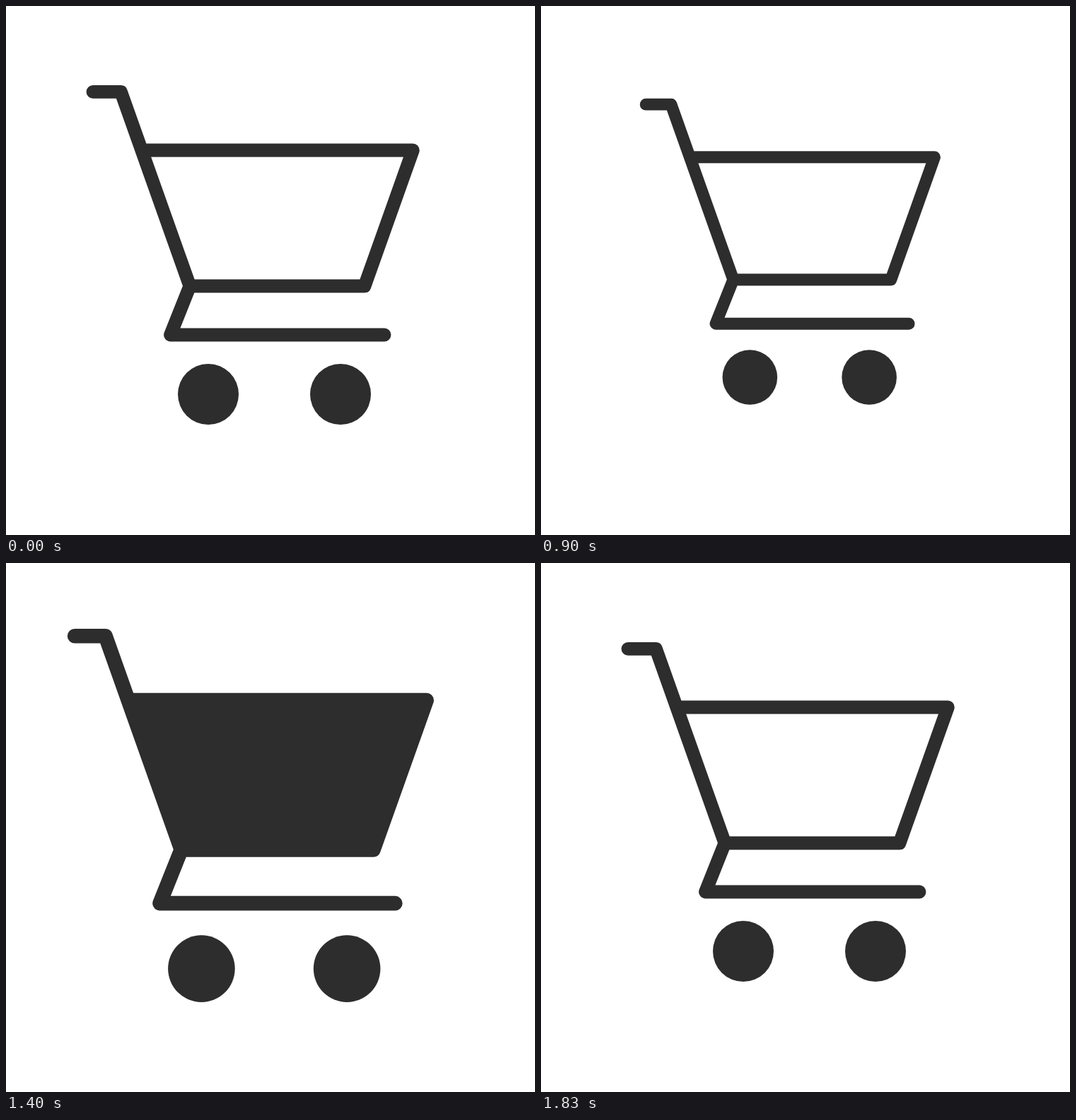
Animation of 748 by 748 pixels, one loop 3060 ms. Source, as an HTML page:

```html
<!DOCTYPE html>
<html lang="en">
<head>
<meta charset="utf-8">
<title>Shopping cart</title>
<style>
  html, body { margin: 0; width: 100%; height: 100%; overflow: hidden; background: #fff; }
  svg { display: block; width: 100vw; height: 100vh; }
  .ink { fill: none; stroke: #2d2d2d; stroke-width: 18.8; stroke-linecap: round; stroke-linejoin: round; }
  .solid { fill: #2d2d2d; }
  #rays { stroke-linecap: round; }
  .rim { stroke: #2d2d2d; stroke-width: 25; }
  .core { stroke: #fff; stroke-width: 13; }
</style>
</head>
<body>
<svg viewBox="0 0 748 748">
  <g id="icon">
    <g id="rays" transform="translate(376 373.6)"></g>
    <path id="load" class="solid" d="M192 204H575.3L507 396H260Z"/>
    <path class="ink" d="M123 121.4H162.5L260 396L232.5 465H535M192 204H575.3L507 396H260"/>
    <circle class="solid" cx="286" cy="549" r="43"/>
    <circle class="solid" cx="473" cy="549" r="43"/>
  </g>
</svg>
<script>
const LOOP = 3060, STEP = 100 / 3;
const RAY_START = 150, RAY_END = 313;
const icon = document.getElementById('icon');
const rays = document.getElementById('rays');
const load = document.getElementById('load');

// Eight outlined rays: a dark line with a white line on top
for (let i = 0; i < 8; i++) {
  for (const kind of ['rim', 'core']) {
    const line = document.createElementNS('http://www.w3.org/2000/svg', 'line');
    line.setAttribute('class', kind);
    line.setAttribute('transform', `rotate(${22.5 + i * 45})`);
    rays.append(line);
  }
}

const clamp = v => Math.min(1, Math.max(0, v));
const mix = (a, b, p) => a + (b - a) * p;
const ramp = (v, from, to) => clamp((v - from) / (to - from));

// cubic-bezier(x1, 0, x2, 1)
function ease(t, x1, x2) {
  if (t <= 0 || t >= 1) return clamp(t);
  let lo = 0, hi = 1, u = 0.5;
  for (let i = 0; i < 24; i++) {
    u = (lo + hi) / 2;
    const v = 1 - u;
    const x = 3 * x1 * v * v * u + 3 * x2 * v * u * u + u * u * u;
    if (x < t) lo = u; else hi = u;
  }
  return u * u * (3 - 2 * u);
}

function draw(time) {
  const k = Math.floor((time % LOOP + 4) / STEP);

  const shrink = ease(ramp(k, 10, 26), 0.4, 0.27);
  const grow = ease(ramp(k, 26, 39), 0.42, 0.49);
  const settle = ease(ramp(k, 42, 55), 0.42, 0.44);
  const scale = 1 - 0.1 * shrink + 0.2 * grow - 0.1 * settle;
  icon.setAttribute('transform', `translate(382 303) scale(${scale}) translate(-382 -303)`);

  load.style.opacity = ramp(k, 27, 31) * (1 - ramp(k, 49, 54));

  const outer = mix(RAY_START, RAY_END, ease(ramp(k, 26, 42), 0.56, 0.23));
  const inner = mix(RAY_START, RAY_END, ease(ramp(k, 32, 42), 0.28, 0.26));
  rays.style.display = k > 27 && k < 42 ? '' : 'none';
  for (const line of rays.children) {
    line.setAttribute('x1', inner);
    line.setAttribute('x2', outer);
  }
}

let start;
function tick(now) {
  start ??= now;
  draw(now - start);
  requestAnimationFrame(tick);
}
draw(0);
requestAnimationFrame(tick);
</script>
</body>
</html>
```
